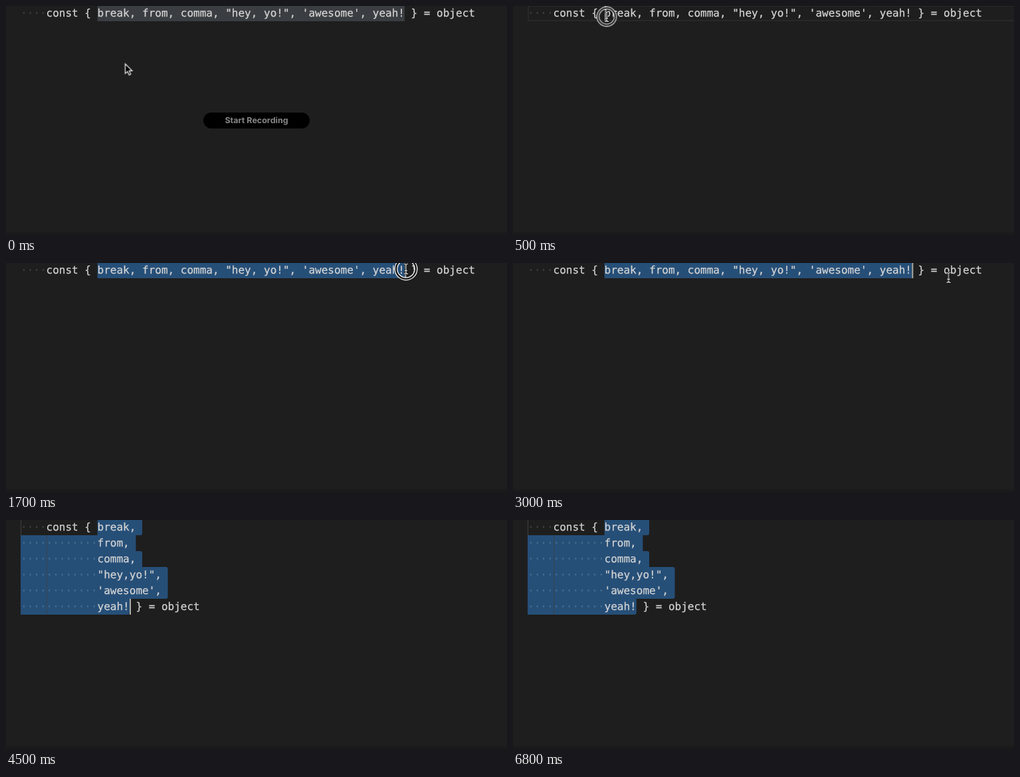
Write an HTML page that moves like this. It is 754 px wide and 346 px high and loops after 6900 ms.

```html
<!DOCTYPE html>
<html lang="en">
<head>
<meta charset="utf-8">
<title>Destructuring split</title>
<style>
  html, body { margin: 0; width: 100%; height: 100%; overflow: hidden; background: #1e1e1e; }
  svg { display: block; }
  text { white-space: pre; text-rendering: geometricPrecision; }
  .code text {
    font: 16px "DejaVu Sans Mono", monospace;
    fill: #d4d4d4; stroke: #d4d4d4; stroke-width: .25;
  }
  .code .dots { fill: #414549; stroke: none; }
  .code .dots.lit { fill: #4b7394; }
  .sel { fill: #264f78; }
  .caret { fill: #aeafad; }
  .guide { fill: #404040; }
  #pill text { font: 700 12.5px Inter, sans-serif; fill: #868686; text-anchor: middle; }
  #ring circle { fill: none; }
</style>
</head>
<body>
<svg width="754" height="346" viewBox="0 0 754 346">
  <rect y="342" width="754" height="4" fill="#1a1a1b"/>

  <g id="single" class="code">
    <rect id="lineBox" x="23" y="0" width="740" height="22" fill="none" stroke="#282828" stroke-width="2"/>
    <rect id="idle" x="137.6" y="-1" width="462.3" height="24" fill="#3a3d41"/>
    <rect id="drag" class="sel" x="137.6" y="-1" width="0" height="24"/>
    <text class="dots" x="22" y="16">····</text>
    <text x="60.5" y="16">const { break, from, comma, "hey, yo!", 'awesome', yeah! } = object</text>
    <g id="caretMove"><rect id="caretA" class="caret" x="138" y="-1" width="2" height="24"/></g>
  </g>

  <g id="split" class="code">
    <g id="rows"></g>
    <rect class="guide" x="22" y="0" width="1" height="23"/>
    <rect class="guide" x="61" y="23" width="1" height="120" opacity=".7"/>
    <rect id="caretB" class="caret" x="186" y="119" width="2" height="24"/>
  </g>

  <g id="pill">
    <rect x="297" y="161" width="160" height="24" rx="12"/>
    <text x="377" y="177.3">Start Recording</text>
  </g>

  <g id="pointer">
    <path id="arrow" d="M0 0V14.5L3.4 11.4L5.7 16.7L8.2 15.6L5.9 10.4H10.4Z" fill="#000" stroke="#fff" stroke-width="1.2"/>
    <g id="ring">
      <circle r="15" stroke="#fff" stroke-width="5"/>
      <circle r="15" stroke="#1e1e1e" stroke-width="2.6"/>
    </g>
    <g id="beam" fill="none">
      <path d="M-3 -7.5Q0 -7.5 0 -5.5Q0 -7.5 3 -7.5M0 -5.5V5.5M-3 7.5Q0 7.5 0 5.5Q0 7.5 3 7.5M-2 2.5H2" stroke="#111" stroke-width="2.8"/>
      <path d="M-3 -7.5Q0 -7.5 0 -5.5Q0 -7.5 3 -7.5M0 -5.5V5.5M-3 7.5Q0 7.5 0 5.5Q0 7.5 3 7.5M-2 2.5H2" stroke="#eee" stroke-width="1.1"/>
    </g>
  </g>
</svg>

<script>
const LOOP = 6900, COL = 9.632, LEFT = 22, LINE = 24;
const $ = id => document.getElementById(id);
const colX = col => LEFT + col * COL;

// Split code: one selected row per property.
const items = ['break,', 'from,', 'comma,', '"hey,yo!",', "'awesome',", 'yeah!'];
const last = items.length - 1;
const ends = items.map((s, i) => 12 + s.length + (i < last ? 1 : 0));

function rowShape(i) {
  const x = colX(i ? 0 : 12), e = colX(ends[i]), y = i * LINE - 1;
  const a = (ends[i - 1] || 0) < ends[i] ? 3 : 0;
  const b = (ends[i + 1] || 0) < ends[i] ? 3 : 0;
  return `M${x} ${y}H${e - a}q${a} 0 ${a} ${a}V${y + LINE - b}q0 ${b} ${-b} ${b}H${x}Z`;
}

$('rows').innerHTML = items.map((item, i) => {
  const y = 16 + i * LINE;
  const code = (i ? '' : 'const { ') + item + (i === last ? ' } = object' : '');
  return `<path class="sel" d="${rowShape(i)}"/>
    <text class="dots ${i ? 'lit' : ''}" x="${LEFT}" y="${y}">${'·'.repeat(i ? 12 : 4)}</text>
    <text x="${colX(i ? 12 : 4)}" y="${y}">${code}</text>`;
}).join('');

// Stops are [ms, value, steps until the next stop]; one step is a hard change.
function track(id, prop, stops) {
  const frames = stops.map(([ms, value, steps = 1]) =>
    ({ offset: ms / LOOP, [prop]: value, easing: `steps(${steps}, end)` }));
  frames.push({ offset: 1, [prop]: stops[stops.length - 1][1] });
  $(id).animate(frames, { duration: LOOP, iterations: Infinity });
}

// Shown first or not, then toggled at each time.
function toggle(id, shown, ...times) {
  track(id, 'opacity', [0, ...times].map((ms, i) => [ms, (i % 2 === 0) === shown ? 1 : 0]));
}

const at = (x, y) => `translate(${x}px, ${y}px)`;

toggle('single', true, 3100);
toggle('split', false, 3100);
toggle('pill', true, 100);
toggle('idle', true, 500);
toggle('lineBox', false, 500, 800);
toggle('arrow', true, 400);
toggle('beam', false, 400, 3100);
toggle('ring', false, 500, 1800);
toggle('caretA', false, 500, 2200, 2700);
toggle('caretB', true, 3600, 4100, 4600, 5100, 5600, 6100, 6600);

track('pointer', 'transform', [
  [0, at(179.5, 87.5)],
  [100, at(179.5, 87.5), 3],
  [400, at(141, 16)],
  [700, at(141, 12), 8],
  [1500, at(602, 9)],
  [1800, at(602, 9), 3],
  [2100, at(655.5, 22)]
]);
track('ring', 'transform', [[0, 'scale(.87)'], [600, 'scale(.94)'], [700, 'scale(1)']]);
track('drag', 'width', [[0, '0px'], [700, '0px', 8], [1500, 48 * COL + 'px']]);
track('caretMove', 'transform', [[0, at(0, 0)], [700, at(0, 0), 8], [1500, at(48 * COL, 0)]]);
</script>
</body>
</html>
```
